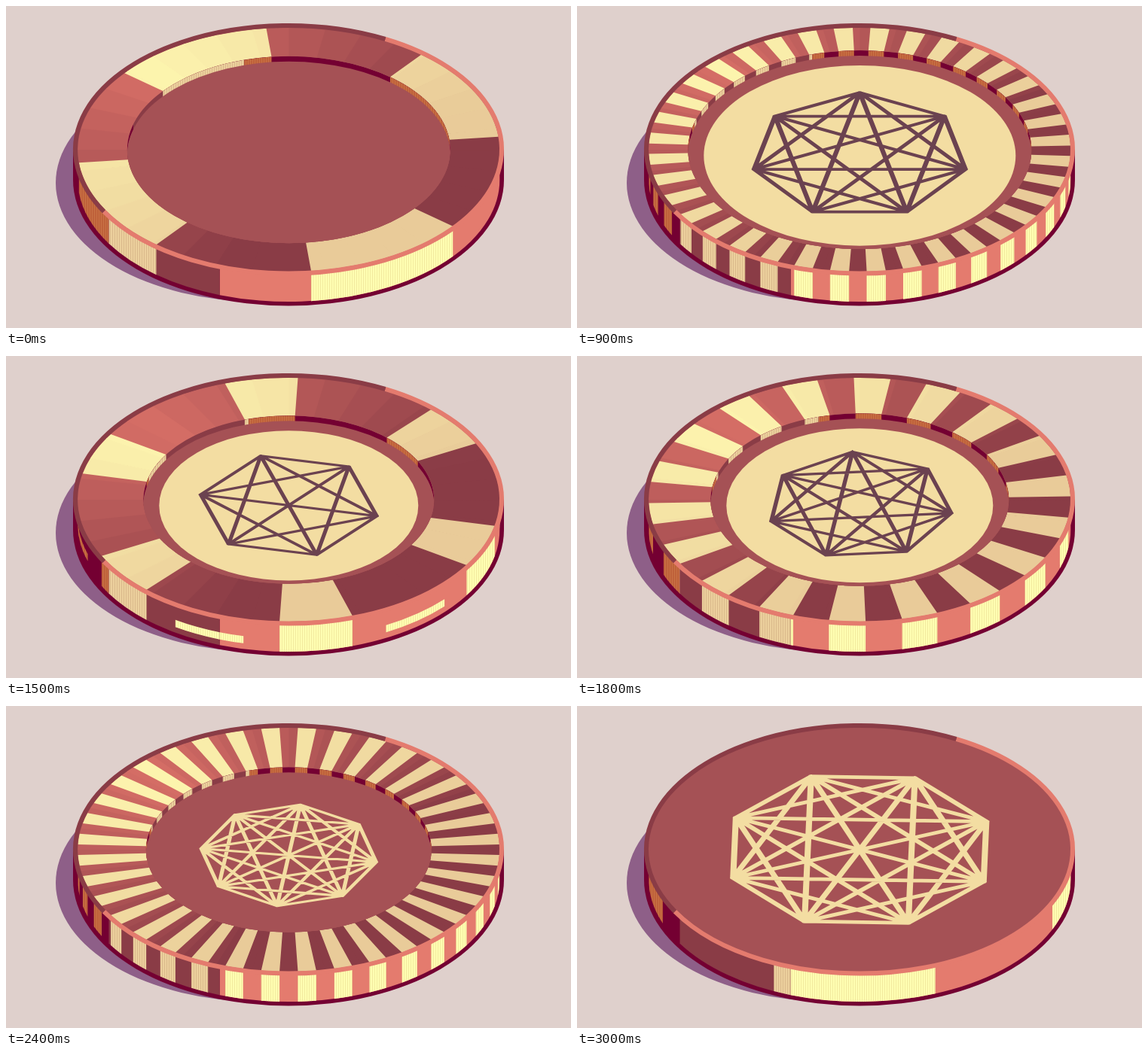
An HTML page with a canvas for the animation above (3.3 s loop, 750 by 428 pixels).

```html
<!DOCTYPE html>
<html lang="en">
<head>
<meta charset="utf-8">
<title>Coin</title>
<style>
html, body { margin: 0; width: 100%; height: 100%; overflow: hidden; background: #dfd0cc; }
canvas { display: block; width: 750px; height: 428px; }
</style>
</head>
<body>
<canvas id="stage" width="750" height="428"></canvas>
<script>
const ctx = document.getElementById('stage').getContext('2d');
const CX = 375.3, CY = 191, R = 280, SQUASH = 0.579;
const DEPTH = 40, HOLE_DEPTH = 7, STEP = 300, FACET = 10;
const RED = '#a55155', DARK = '#8a3c46', CORAL = '#e47b6e', MAROON = '#740032';
const CREAM = '#f3dda2', PLUM = '#6b4250';
const YELLOW = ['#ffffb2', '#e6d68c'], TAN = ['#ecd09d', '#c8a27a'], ORANGE = ['#bf613a', '#d18450'];

// n sectors of `width` degrees from `start`; hole radius; cut = inner radius of light sectors;
// bars = extra dashes on the edge; net = corners of the emblem, turned by `turn`
const coins = [
  { n: 4, start: 38.9, width: 45, hole: 214.5 },
  { n: 6, start: 20, width: 30, hole: 203 },
  { n: 8, start: 27.4, width: 22.4, hole: 190, cut: 225 },
  { n: 36, start: 2.9, width: 5.2, hole: 228, disc: true, net: 7, turn: 12.86 },
  { n: 8, start: 12.4, width: 22.5, hole: 212, disc: true, net: 6, turn: 12.4 },
  { n: 6, start: 12.4, width: 20.1, hole: 193, disc: true, net: 6, turn: 11.9, bars: true },
  { n: 18, start: 8.4, width: 10, hole: 198, disc: true, net: 7, turn: 8.4 },
  { n: 36, start: 8.4, width: 5, hole: 200, disc: true, net: 7, turn: 5.6 },
  { n: 36, start: 2.5, width: 5, hole: 189.5, net: 8, turn: 7.6 },
  { n: 8, start: 24, width: 22.5, hole: R, disc: true, net: 7, turn: 24 },
  { n: 4, start: 69, width: 45, hole: R, net: 8, turn: 24 }
];

const rad = deg => deg * Math.PI / 180;

function oval(x, y, rx, ry, color) {
  ctx.beginPath();
  ctx.ellipse(x, y, rx, ry, 0, 0, 2 * Math.PI);
  ctx.fillStyle = color;
  ctx.fill();
}

// Area between two elliptic arcs; serves upright walls and flat rings alike.
function arcStrip(a0, a1, r0, y0, r1, y1, color) {
  ctx.beginPath();
  ctx.ellipse(CX, y0, r0, r0 * SQUASH, 0, rad(a0), rad(a1));
  ctx.ellipse(CX, y1, r1, r1 * SQUASH, 0, rad(a1), rad(a0), true);
  ctx.closePath();
  ctx.fillStyle = color;
  ctx.fill();
}

function wall(a0, a1, r, top, bottom, [base, line]) {
  arcStrip(a0, a1, r, CY + top, r, CY + bottom, base);
  if (!line) return;
  ctx.save();
  ctx.clip();
  ctx.fillStyle = line;
  ctx.globalAlpha = 0.5;
  const ends = [a0, a1].map(a => CX + r * Math.cos(rad(a)));
  for (let x = Math.floor(Math.min(...ends) / 3) * 3; x < Math.max(...ends); x += 3) {
    ctx.fillRect(x, 0, 1, 428);
  }
  ctx.restore();
}

// Calls paint for each part of the light sectors within [from, to].
function eachSector(coin, from, to, paint, offset = 0) {
  for (let k = -coin.n; k <= coin.n; k++) {
    const a = coin.start + offset + k * 360 / coin.n, end = a + coin.width;
    const lo = Math.max(a, from), hi = Math.min(end, to);
    if (lo < hi) paint(lo, hi, end);
  }
}

function mix(a, b, t) {
  return `rgb(${a.map((v, i) => Math.round(v + (b[i] - v) * t)).join()})`;
}

function light(angle) {
  const away = Math.abs((angle - 222 + 540) % 360 - 180);
  return Math.max(0, 1 - away / 115);
}

function drawEdge(coin) {
  const zones = [[0, 109.1, CORAL, YELLOW], [109.1, 148.6, DARK, TAN], [148.6, 185, MAROON, ORANGE]];
  for (const [from, to, base, pale] of zones) {
    wall(from, to, R, 0, DEPTH, [base]);
    eachSector(coin, from, to, (a, b) => wall(a, b, R, 0, DEPTH, pale));
    if (coin.bars) {
      eachSector(coin, from, to, (a, b) => wall(a, b, R, 23, 32.5, from > 148 ? pale : YELLOW), 30);
    }
  }
}

function drawRing(coin) {
  for (let a = 0; a < 360; a += FACET) {
    const t = light(a + FACET / 2);
    arcStrip(a, a + FACET + 0.3, R, CY, coin.hole, CY, mix([138, 60, 70], [214, 110, 102], t));
  }
  const inner = coin.cut || coin.hole;
  for (let a = 0; a < 360; a += FACET) {
    const color = mix([233, 203, 153], [253, 245, 174], light(a + FACET / 2));
    eachSector(coin, a, a + FACET, (lo, hi, end) =>
      arcStrip(lo, Math.min(hi + 0.3, end), R, CY, inner, CY, color));
  }
}

function drawHole(coin) {
  const r = coin.hole;
  ctx.save();
  oval(CX, CY, r, r * SQUASH, RED);
  ctx.clip();
  const zones = [[175, 196, MAROON, ORANGE], [196, 254, DARK, TAN], [254, 365, MAROON, ORANGE]];
  for (const [from, to, base, pale] of zones) {
    wall(from, to, r, 0, HOLE_DEPTH + 1, [base]);
    if (!coin.cut) eachSector(coin, from, to, (a, b) => wall(a, b, r, 0, HOLE_DEPTH + 1, pale));
  }
  oval(CX, CY + HOLE_DEPTH, r, r * SQUASH, RED);
  ctx.restore();
}

function drawNet(coin, y, r) {
  const corners = Array.from({ length: coin.net }, (_, i) => {
    const a = rad(coin.turn + i * 360 / coin.net);
    return [r * Math.cos(a), r * Math.sin(a)];
  });
  ctx.save();
  ctx.translate(CX, y);
  ctx.scale(1, SQUASH);
  ctx.strokeStyle = coin.disc ? PLUM : CREAM;
  ctx.lineWidth = r * 0.045;
  ctx.lineCap = 'round';
  ctx.beginPath();
  corners.forEach((p, i) => corners.slice(i + 1).forEach(q => {
    ctx.moveTo(...p);
    ctx.lineTo(...q);
  }));
  ctx.stroke();
  ctx.restore();
}

function drawRim(from, to, color) {
  ctx.beginPath();
  ctx.ellipse(375, 190.7, 283, 164.8, 0, rad(from), rad(to));
  ctx.strokeStyle = color;
  ctx.lineWidth = 6;
  ctx.stroke();
}

function drawCoin(coin) {
  ctx.fillStyle = '#dfd0cc';
  ctx.fillRect(0, 0, 750, 428);
  oval(336, 235, 270, 158, '#8e5f88');

  oval(375, 231, 286, 167.5, MAROON);
  ctx.fillStyle = MAROON;
  ctx.fillRect(89, 190.5, 572, 40.5);
  drawEdge(coin);
  oval(375, 190.7, 285, 166.8, RED);

  const sunken = coin.hole < R;
  const floorY = CY + (sunken ? HOLE_DEPTH + 0.5 : 0);
  const discR = coin.hole - 21;
  if (sunken) {
    drawRing(coin);
    drawHole(coin);
  }
  if (coin.disc) oval(CX, floorY + 0.3, discR, discR * SQUASH, CREAM);
  if (coin.net) drawNet(coin, floorY, discR * 0.695);

  drawRim(-63, 150, CORAL);
  drawRim(150, 297, DARK);
}

let shown = -1;
function tick() {
  const index = Math.floor(performance.now() / STEP) % coins.length;
  if (index !== shown) drawCoin(coins[shown = index]);
  requestAnimationFrame(tick);
}
tick();
</script>
</body>
</html>
```
